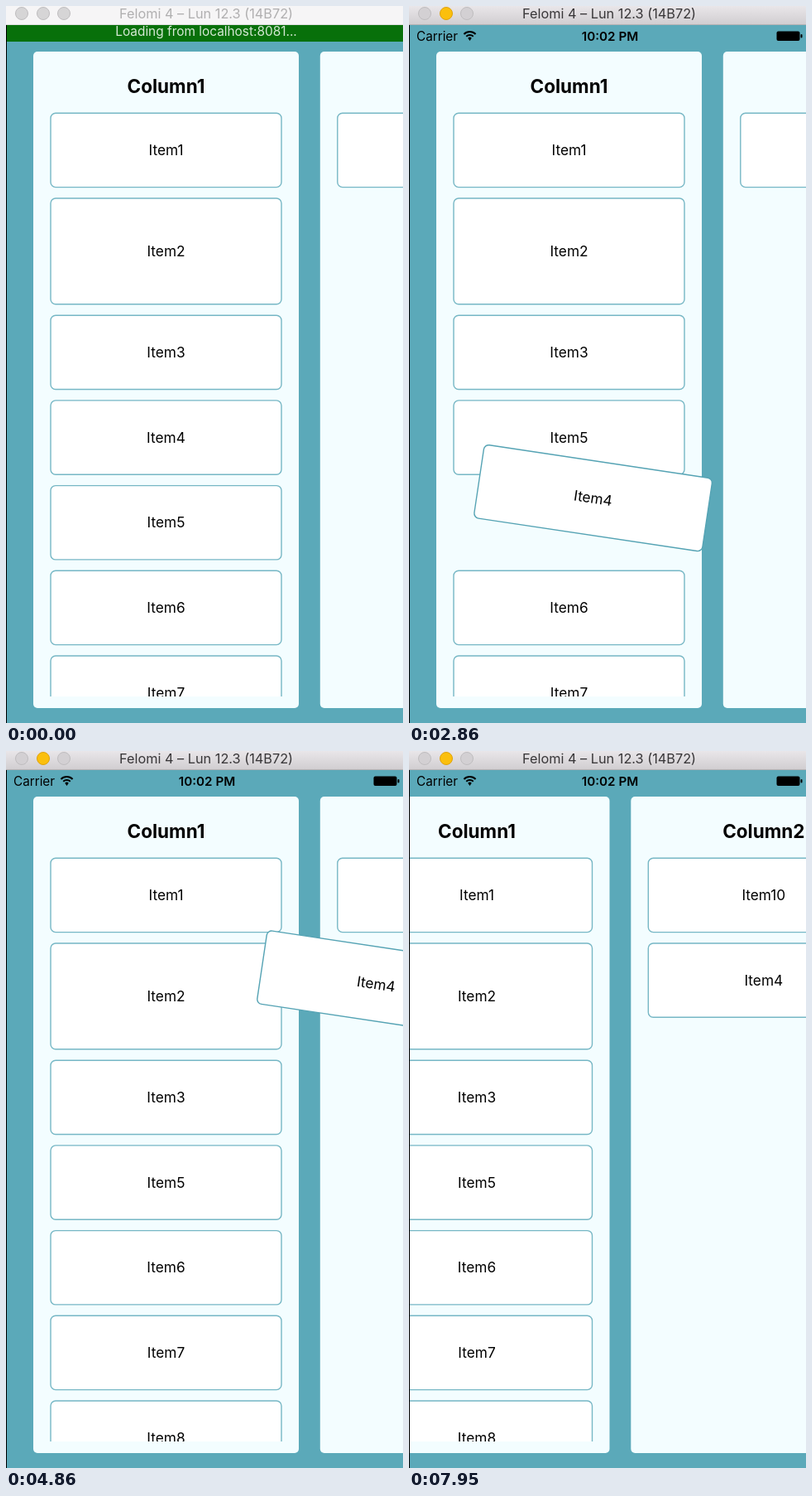
Animation, 480 px wide and 865 px high, one loop 8000 ms. Source, as an HTML page with a canvas:

```html
<!DOCTYPE html>
<html lang="en">
<head>
<meta charset="utf-8">
<title>Draggable board</title>
<style>
  html, body { margin: 0; width: 100%; height: 100%; overflow: hidden; background: #5ba9b9; }
  canvas { display: block; width: 480px; height: 865px; }
</style>
</head>
<body>
<canvas id="stage"></canvas>
<script>
const W = 480, H = 865, LOOP = 8000;
const TEAL = '#5ba9b9', PANEL = '#f3fdff';
const ITEM_W = 279, ITEM_H = 89.3, GAP = 13.4, TILT = 8.5 * Math.PI / 180;
const PICK_UP = 1800, SWAP = 2750, CHANGE_COLUMN = 3850, DROPPED = 5400, FOCUS = 1000;

// Keyframes: [time, value]
const dragX = [[1750, 194], [2180, 213], [2800, 222], [3590, 229.5], [3850, 320], [4140, 415], [4500, 449], [4860, 447.5], [5200, 447.5], [5400, 540.5]];
const dragY = [[1750, 520.5], [2180, 540], [2900, 594], [3590, 591], [3850, 522], [4140, 428], [4500, 320], [4860, 281], [5200, 281], [5400, 276.7]];
const tilt = [[1800, 0], [2000, TILT], [5200, TILT], [5400, 0]];
const scroll = [[5800, 0], [6200, 22], [6590, 77], [6950, 103], [7500, 111.5]];

const canvas = document.getElementById('stage');
const ctx = canvas.getContext('2d');
const ratio = window.devicePixelRatio || 1;
canvas.width = W * ratio;
canvas.height = H * ratio;

// Smooth monotone curve through the keyframes
function track(keys, t) {
  const last = keys.length - 1;
  if (t <= keys[0][0]) return keys[0][1];
  if (t >= keys[last][0]) return keys[last][1];
  const chord = i => (keys[i + 1][1] - keys[i][1]) / (keys[i + 1][0] - keys[i][0]);
  const slope = i => {
    if (i === 0 || i === last) return 0;
    const a = chord(i - 1), b = chord(i);
    return a * b <= 0 ? 0 : 2 * a * b / (a + b);
  };
  const i = keys.findIndex(k => k[0] > t) - 1;
  const [t0, v0] = keys[i], [t1, v1] = keys[i + 1];
  const d = t1 - t0, u = (t - t0) / d, ease = u * u * (3 - 2 * u);
  return v0 + (v1 - v0) * ease
    + d * u * (1 - u) * ((1 - u) * slope(i) - u * slope(i + 1));
}

function text(str, x, baseline, size, color = '#000', weight = 400, align = 'center') {
  ctx.font = `${weight} ${size}px Inter, Roboto, sans-serif`;
  ctx.fillStyle = color;
  ctx.textAlign = align;
  ctx.fillText(str, x, baseline);
}

function rect(x, y, w, h, color) {
  ctx.fillStyle = color;
  ctx.fillRect(x, y, w, h);
}

function roundRect(x, y, w, h, r, fill, stroke) {
  ctx.beginPath();
  ctx.roundRect(x, y, w, h, r);
  ctx.fillStyle = fill;
  ctx.fill();
  if (stroke) {
    ctx.strokeStyle = stroke;
    ctx.lineWidth = 1.4;
    ctx.stroke();
  }
}

function card(id, cx, cy, h = ITEM_H, angle = 0, border = '#76b7c5') {
  ctx.save();
  ctx.translate(cx, cy);
  ctx.rotate(angle);
  roundRect(-ITEM_W / 2, -h / 2, ITEM_W, h, 6, '#fff', border);
  text('Item' + id, 0, 6.2, 17.3);
  ctx.restore();
}

function column(x, title, ids, held) {
  roundRect(x, 55, 321, 792, 5, PANEL);
  text(title, x + 160.5, 105, 22.5, '#000', 700);
  ctx.save();
  ctx.beginPath();
  ctx.rect(x, 110, 321, 723);
  ctx.clip();
  let y = 129.3;
  for (const id of ids) {
    const h = id === 2 ? 127.8 : ITEM_H;
    if (id !== held) card(id, x + 160.5, y + h / 2, h);
    y += h + GAP;
  }
  ctx.restore();
}

function statusBar() {
  text('Carrier', 9, 42, 15.3, '#000', 400, 'left');
  text('10:02 PM', 243, 42, 15.2, '#000', 600);
  ctx.strokeStyle = '#000';
  ctx.lineWidth = 2;
  for (const r of [6, 10]) {
    ctx.beginPath();
    ctx.arc(73.5, 41, r, -Math.PI * 0.75, -Math.PI * 0.25);
    ctx.stroke();
  }
  ctx.beginPath();
  ctx.moveTo(73.5, 42);
  ctx.arc(73.5, 41, 3.2, -Math.PI * 0.75, -Math.PI * 0.25);
  ctx.fillStyle = '#000';
  ctx.fill();
  roundRect(444.5, 30.5, 28, 11.5, 2, '#000');
  roundRect(473.5, 34, 2, 4.5, 1, '#000');
}

function loadingBanner(t) {
  const lift = Math.min(26, 5.6 + t / 55);
  rect(0, 23 - lift, W, 25.6, '#08700a');
  text('Loading from localhost:8081...', 242, 41.2 - lift, 15.4, '#d5e8d5');
}

function titleBar(active) {
  const shade = ctx.createLinearGradient(0, 0, 0, 22);
  shade.addColorStop(0, active ? '#e9e6e9' : '#f6f5f6');
  shade.addColorStop(1, active ? '#d1ced1' : '#f6f5f6');
  rect(0, 0, W, 23, shade);
  rect(0, 22, W, 1, active ? '#b5b3b5' : '#dededf');
  [19, 45, 70].forEach((x, i) => {
    const lit = active && i === 1;
    ctx.beginPath();
    ctx.arc(x, 9, 7.5, 0, Math.PI * 2);
    ctx.fillStyle = lit ? '#fbbf0c' : active ? '#d3d0d3' : '#d6d5d6';
    ctx.fill();
    ctx.strokeStyle = lit ? '#dfa20b' : '#bfbdbf';
    ctx.lineWidth = 1;
    ctx.stroke();
  });
  text('Felomi 4 – Lun 12.3 (14B72)', 242, 15.3, 16.3, active ? '#383638' : '#b0afb0');
}

function draw(now) {
  const t = now % LOOP;
  const held = t >= PICK_UP && t < DROPPED ? 4 : 0;
  const moved = t >= CHANGE_COLUMN;
  const first = moved ? [1, 2, 3, 5, 6, 7, 8]
    : t >= SWAP ? [1, 2, 3, 5, 4, 6, 7] : [1, 2, 3, 4, 5, 6, 7];
  const offset = track(scroll, t);

  ctx.setTransform(ratio, 0, 0, ratio, 0, 0);
  rect(0, 0, W, H, TEAL);
  column(33 - offset, 'Column1', first, held);
  column(379.8 - offset, 'Column2', moved ? [10, 4] : [10], held);
  if (held) card(4, track(dragX, t), track(dragY, t), ITEM_H, track(tilt, t), '#55a3b4');
  statusBar();
  loadingBanner(t);
  rect(0, 23, 1, H, '#000');
  titleBar(t >= FOCUS);
  requestAnimationFrame(draw);
}
requestAnimationFrame(draw);
</script>
</body>
</html>
```
